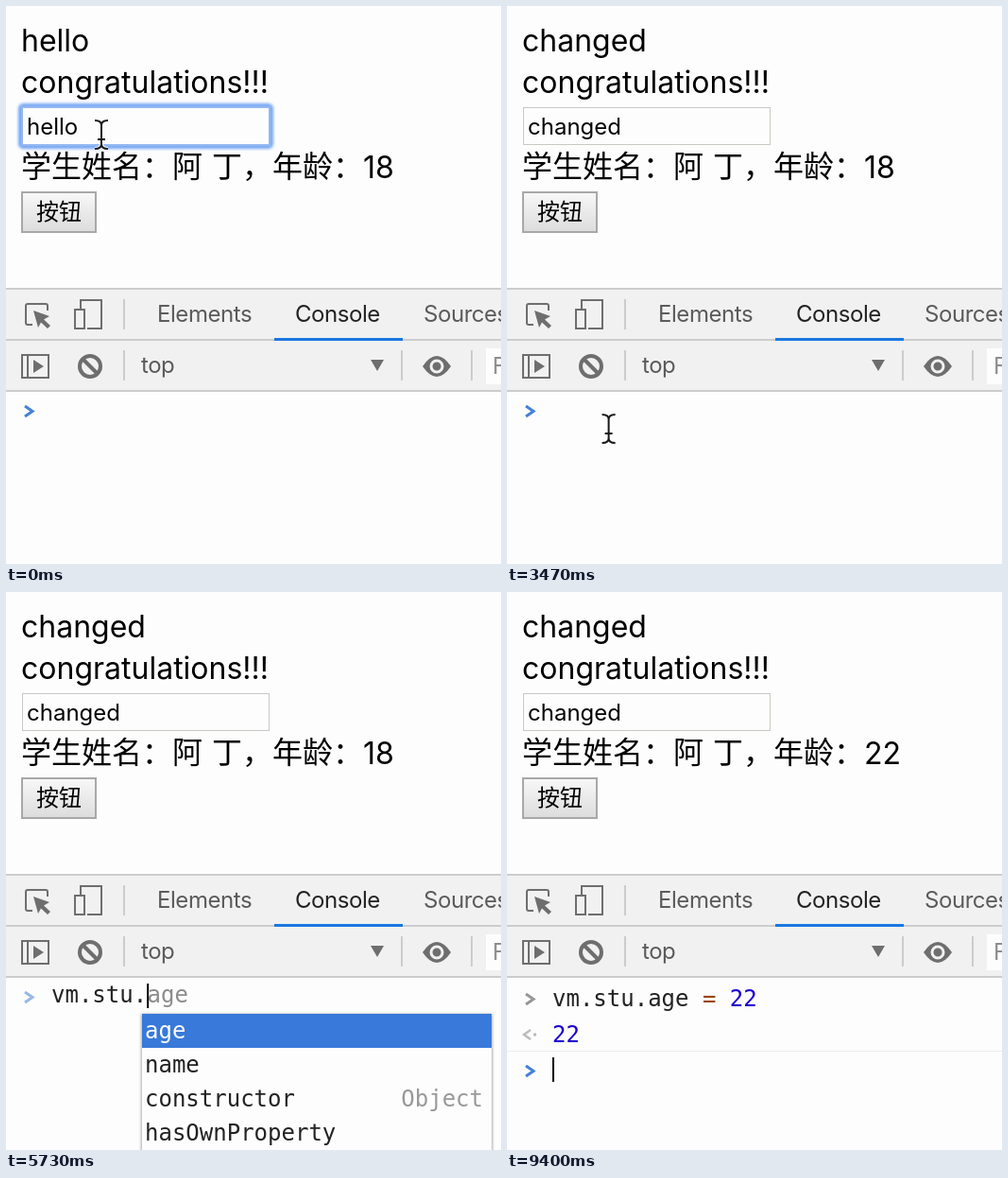
Animation of 524 by 590 pixels, one loop 9470 ms. Source, as an HTML page:

```html
<!DOCTYPE html>
<html lang="zh-CN">
<head>
<meta charset="utf-8">
<title>Data binding demo</title>
<style>
  html, body { margin: 0; width: 100%; height: 100%; overflow: hidden; background: #fdfdfd; }
  svg { display: block; }
  text { white-space: pre; }
  .page { font: 32px Inter, sans-serif; }
  .cjk { font-family: "Noto Sans CJK SC", sans-serif; }
  .field { font: 24px Inter, sans-serif; }
  .tools { font: 24px Inter, sans-serif; letter-spacing: -.45px; fill: #5a5a5a; }
  .code { font: 24px "DejaVu Sans Mono", monospace; fill: #222; }
  .op { fill: #994500; }
  .num { fill: #1c00cf; }
  .line { fill: none; stroke: #6e6e6e; stroke-width: 2; }
  .solid { fill: #6e6e6e; }
  .rule { stroke: #ccc; stroke-width: 2; }
  .chevron { fill: none; stroke: #4480d8; stroke-width: 3; }
</style>
</head>
<body>
<svg width="524" height="590" viewBox="0 0 524 590">
  <defs>
    <filter id="blur" x="-10%" y="-30%" width="120%" height="160%"><feGaussianBlur stdDeviation="1.5"/></filter>
    <linearGradient id="face" x2="0" y2="1"><stop stop-color="#f8f8f8"/><stop offset="1" stop-color="#dcdcdc"/></linearGradient>
  </defs>

  <g class="page">
    <text id="message" x="16" y="48"></text>
    <text x="16" y="92">congratulations!!!</text>
    <text class="cjk" y="181"><tspan x="16">学生姓名：阿</tspan><tspan x="218">丁，年龄：</tspan></text>
    <text id="age" x="378" y="182"></text>
  </g>

  <g id="glow">
    <rect x="15.5" y="105.5" width="265" height="43" rx="3" fill="none" stroke="#74a6f3" stroke-width="5" filter="url(#blur)"/>
    <rect x="17" y="107" width="262" height="40" fill="#fdfdfd" stroke="#94b8f0" stroke-width="2"/>
  </g>
  <rect id="plain" x="17.5" y="107.5" width="261" height="39" fill="#fdfdfd" stroke="#c8c8c4"/>
  <rect id="selection" x="22" y="113" width="55" height="29" fill="#b4d5fe"/>
  <text id="field" class="field" x="22" y="136"></text>

  <rect x="17" y="197" width="78" height="42" fill="url(#face)" stroke="#a8a8a8" stroke-width="2"/>
  <text class="cjk" x="32" y="226" font-size="24">按钮</text>

  <rect y="298" width="524" height="110" fill="#f1f1f1"/>
  <path class="rule" d="M0 299H524M0 353H524M0 407H524M125 310V342M125 364V396M419 364V396M493 364V396"/>
  <rect x="284" y="351" width="136" height="3" fill="#1a78e0"/>
  <rect x="508" y="362" width="16" height="38" fill="#fdfdfd"/>
  <g class="tools">
    <text x="160" y="334">Elements</text>
    <text x="306" y="334" style="fill:#222">Console</text>
    <text x="442" y="334">Sources</text>
    <text x="143" y="388">top</text>
    <text x="515" y="389" style="fill:#8c8c8c">Filter</text>
  </g>
  <path class="line" d="M28 337H23Q21 337 21 335V317Q21 315 23 315H42Q44 315 44 317V322
    M79 320V311H101V341H86M73 321H83V341H73ZM17 369H45V393H17ZM23 369V393"/>
  <path class="solid" d="M29 322L46 328L40 331.5L47 338L44 341L37 334.5L34 340Z
    M29 374L40 381L29 388ZM386 374H400L393 386Z M441 381Q456 359 471 381Q456 403 441 381Z"/>
  <g class="line">
    <circle cx="89" cy="381" r="11" stroke-width="4"/>
    <path d="M81 373L97 389" stroke-width="4"/>
    <circle cx="456" cy="381" r="6" style="stroke:#f1f1f1;stroke-width:3"/>
  </g>

  <g id="history">
    <path class="chevron" d="M20 425L28 430.5L20 436" style="stroke:#969696"/>
    <text class="code" x="48" y="438">vm.stu.age <tspan class="op">=</tspan> <tspan class="num">22</tspan></text>
    <path d="M25 463L18 468L25 473" class="chevron" style="stroke:#bbb;stroke-width:2.5"/>
    <circle cx="29.5" cy="468" r="1.8" fill="#bbb"/>
    <text class="code" x="48" y="476" style="fill:#1c00cf">22</text>
    <path d="M0 485.5H524" stroke="#ececec"/>
  </g>

  <path id="prompt" class="chevron"/>
  <text id="ghost" class="code" x="149.5" y="434" style="fill:#8c8c8c">age</text>
  <text id="entry" class="code" x="48" y="434"></text>

  <g id="popup" class="code">
    <rect x="143" y="446" width="372" height="150" fill="#777" opacity=".6" filter="url(#blur)"/>
    <rect x="144" y="446" width="370" height="150" fill="#fdfdfd"/>
    <rect x="144" y="446" width="370" height="36" fill="#3879d9"/>
    <text x="147" y="472" fill="#fdfdfd">age</text>
    <text x="147" y="508">name</text>
    <text x="147" y="544">constructor</text>
    <text x="505" y="544" text-anchor="end" fill="#999">Object</text>
    <text x="147" y="580">hasOwnProperty</text>
  </g>

  <rect id="caret" width="2"/>
  <path id="arrow" d="M0 0V28L6 22.5L11 34L16.5 31.5L11.5 20.5H20Z" stroke="#fff" stroke-width="2"/>
  <g id="beam" fill="none">
    <path id="beamShape" d="M-7-15Q0-15 0-10V10Q0 15-7 15M7-15Q0-15 0-10M7 15Q0 15 0 10M-4 5H4" stroke="#fdfdfd" stroke-width="4"/>
    <path d="M-7-15Q0-15 0-10V10Q0 15-7 15M7-15Q0-15 0-10M7 15Q0 15 0 10M-4 5H4" stroke="#181818" stroke-width="2"/>
  </g>
</svg>
<script>
const LOOP = 9470;
const BLUR = 2560, CHANGED = 2680, CONSOLE_FOCUS = 3900, ENTER = 8350;

const fieldKeys = [[-600, 'hello'], [990, 't'], [1060, 'te'], [1240, 'tes'], [1390, 'test'], [CHANGED, 'changed']];
const entryKeys = [
  [CONSOLE_FOCUS, ''], [4550, 'v'], [4750, 'vm'], [5000, 'vm.'], [5150, 'vm.s'], [5300, 'vm.st'],
  [5450, 'vm.stu'], [5600, 'vm.stu.'], [6300, 'vm.stu.age'], [6800, 'vm.stu.age '],
  [7000, 'vm.stu.age ='], [7200, 'vm.stu.age = '], [7650, 'vm.stu.age = 2'],
  [7950, 'vm.stu.age = 22'], [ENTER, '']
];
// Pointer stops: time, x, y
const stops = [[0, 101, 136], [1750, 101, 136], [2350, 63, 214], [2900, 63, 214], [3600, 112, 470]];

const $ = id => document.getElementById(id);
const show = (id, on) => $(id).style.display = on ? '' : 'none';
const between = (t, from, to) => t >= from && t < to;
const latest = (list, t) => list.findLast(item => item[0] <= t) || list[0];
const setText = (id, value) => { if ($(id).textContent !== value) $(id).textContent = value; };

function pointerAt(t) {
  const next = stops.findIndex(stop => stop[0] > t);
  if (next < 0) return stops.at(-1).slice(1);
  const [t0, x0, y0] = stops[next - 1], [t1, x1, y1] = stops[next];
  const p = (t - t0) / (t1 - t0), ease = p * p * (3 - 2 * p);
  return [x0 + (x1 - x0) * ease, y0 + (y1 - y0) * ease];
}

function drawPointer(t) {
  const [x, y] = pointerAt(t);
  const visible = t < 990 || between(t, 1750, 4550);
  const overText = y < 190 || y > 410;
  show('beam', visible && overText);
  show('arrow', visible && !overText);
  for (const id of ['beam', 'arrow']) $(id).setAttribute('transform', `translate(${x} ${y})`);
}

function drawCaret(t, focused, selected) {
  const inConsole = t >= CONSOLE_FOCUS;
  const [since] = latest(inConsole ? entryKeys : fieldKeys, t);
  const blinkOn = (t - since) % 1000 < 500;
  show('caret', blinkOn && !selected && (focused || inConsole));
  const host = $(inConsole ? 'entry' : 'field');
  const start = inConsole ? 48 : 22;
  const top = !inConsole ? 113 : t >= ENTER ? 492 : 414;
  $('caret').setAttribute('x', start + (host.textContent ? host.getComputedTextLength() : 0));
  $('caret').setAttribute('y', top);
  $('caret').setAttribute('height', inConsole ? 26 : 29);
}

function render(t) {
  const value = latest(fieldKeys, t)[1];
  const focused = t < BLUR, selected = between(t, 400, 990);
  const suggesting = between(t, 5600, 6300), entered = t >= ENTER;

  setText('message', value);
  setText('field', value);
  setText('age', entered ? '22' : '18');
  show('glow', focused);
  show('plain', !focused);
  show('selection', selected);

  const code = latest(entryKeys, t)[1];
  if ($('entry').textContent !== code) {
    $('entry').innerHTML = code.replace(/=|\d+/g, m => `<tspan class="${m === '=' ? 'op' : 'num'}">${m}</tspan>`);
  }
  show('ghost', suggesting);
  show('popup', suggesting);
  show('history', entered);
  $('prompt').setAttribute('d', `M20 ${entered ? 501 : 423}l8 5.5l-8 5.5`);
  $('prompt').setAttribute('opacity', suggesting ? .55 : 1);

  drawCaret(t, focused, selected);
  drawPointer(t);
}

const start = performance.now();
(function tick() {
  render((performance.now() - start) % LOOP);
  requestAnimationFrame(tick);
})();
</script>
</body>
</html>
```
